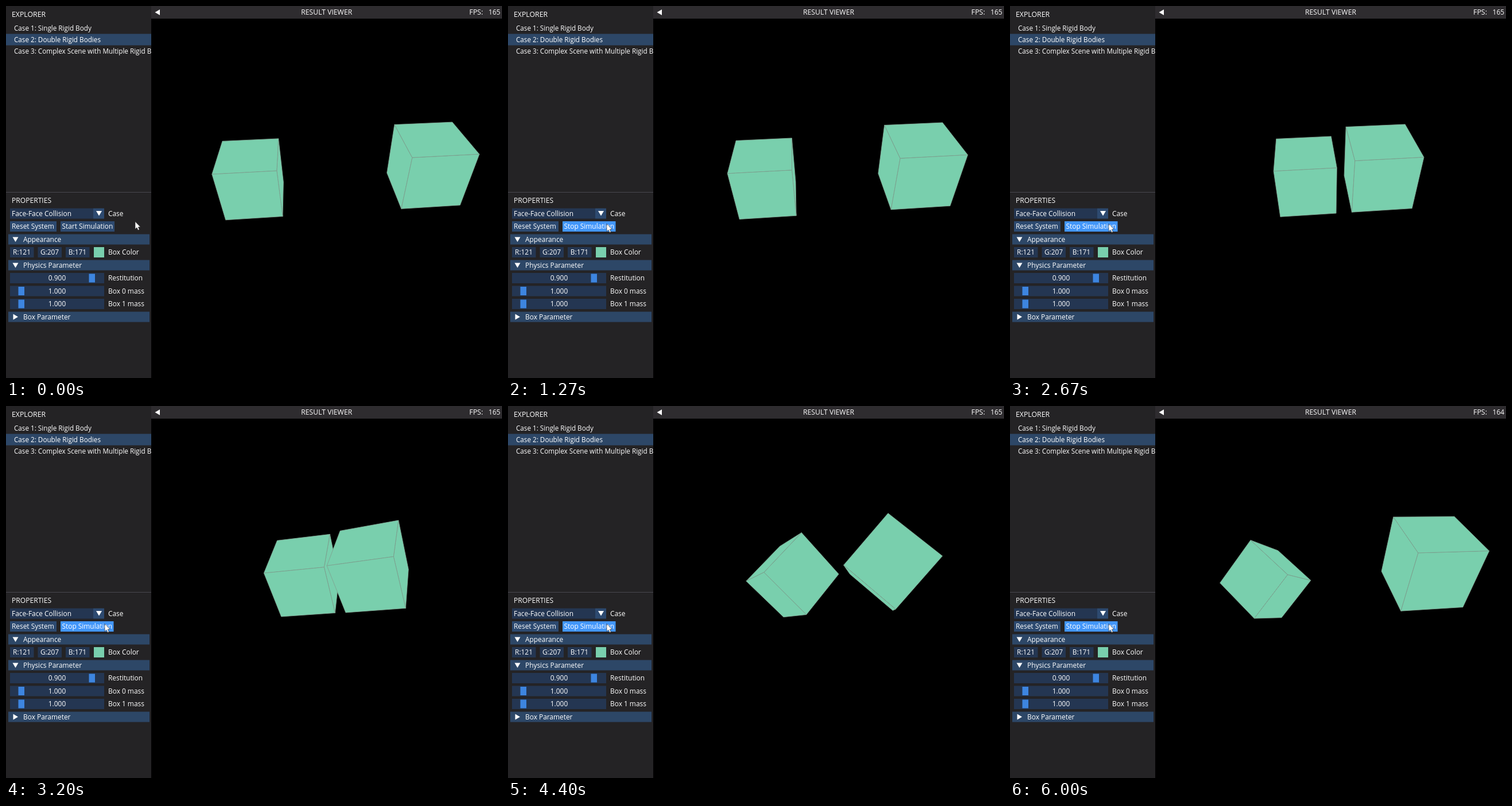
Animation, 864 px wide and 648 px high, one loop 6070 ms. Source, as an HTML page with a canvas:

```html
<!DOCTYPE html>
<html>
<head>
<meta charset="utf-8">
<style>
  html, body { margin: 0; width: 100%; height: 100%; overflow: hidden; background: #000; }
  canvas { display: block; }
</style>
</head>
<body>
<canvas id="stage" width="864" height="648"></canvas>
<script>
const ctx = document.getElementById('stage').getContext('2d');
const LOOP = 6070, START = 0.845, IMPACT = 2.88, SECOND_HIT = 3.8, SPEED = 0.487;
const FRAME = '#243652', BUTTON = '#2d4a70', HEADER = '#2d4767', GRAB = '#3d85e0', MINT = '#79cfad';

// Camera: centre of the view, focal length, world origin in camera space, pitch and yaw
const VIEW = { x: 558.5, y: 335, f: 542, origin: [0.1765, -0.456, 5.3825] };
const sp = Math.sin(0.7138), cp = Math.cos(0.7138), sy = Math.sin(0.0907), cy = Math.cos(0.0907);

// Positions at the first impact, velocities after each hit, spin in degrees per second
const boxes = [
  { at: [-0.5, -0.2, -0.207], side: -1, after: [-0.335, -0.15, -0.15], spin: [47.9, 31.5] },
  { at: [0.5, 0.2, 0.207], side: 1, after: [0.285, 0.14, 0.165], spin: [83, 44.4] }
];

function project([x, y, z]) {
  const [ox, oy, oz] = VIEW.origin;
  const cx = ox + x * cy + z * sy;
  const cyy = oy - x * sy * sp - y * cp + z * sp * cy;
  const cz = oz + x * sy * cp - y * sp - z * cp * cy;
  return [VIEW.x + VIEW.f * cx / cz, VIEW.y + VIEW.f * cyy / cz];
}

// Rotation about the diagonal axis (0, -1, 1)
function spinPoint([x, y, z], angle) {
  const c = Math.cos(angle), s = Math.sin(angle), r = Math.SQRT1_2;
  const m = (y + z) * r, n = (z - y) * r, m2 = s * x + c * m;
  return [c * x - s * m, (m2 - n) * r, (m2 + n) * r];
}

function polygon(points, fill, stroke, width = 1) {
  ctx.beginPath();
  points.forEach(p => ctx.lineTo(p[0], p[1]));
  ctx.closePath();
  if (fill) { ctx.fillStyle = fill; ctx.fill(); }
  if (stroke) { ctx.strokeStyle = stroke; ctx.lineWidth = width; ctx.stroke(); }
}

function drawBox(box, t) {
  const before = Math.min(Math.max(t, START), IMPACT) - IMPACT;
  const first = Math.min(Math.max(t - IMPACT, 0), SECOND_HIT - IMPACT);
  const second = Math.max(t - SECOND_HIT, 0);
  const angle = (box.spin[0] * first + box.spin[1] * second) * Math.PI / 180;
  const centre = box.at.map((p, i) => p + box.after[i] * second);
  centre[0] += box.side * (0.14 * first - SPEED * before);

  for (let axis = 0; axis < 3; axis++) for (const sign of [-0.5, 0.5]) {
    let face = [[-1, -1], [1, -1], [1, 1], [-1, 1]].map(([a, b]) => {
      const p = [];
      p[axis] = sign;
      p[(axis + 1) % 3] = a / 2;
      p[(axis + 2) % 3] = b / 2;
      return project(spinPoint(p, angle).map((v, i) => v + centre[i]));
    });
    if (sign < 0) face.reverse();
    const area = face.reduce((sum, p, i) => {
      const q = face[(i + 1) % 4];
      return sum + p[0] * q[1] - q[0] * p[1];
    }, 0);
    if (area < 0) polygon(face, MINT, '#7f9f8e', 0.8);
  }
}

function rect(x, y, w, h, color) {
  ctx.fillStyle = color;
  ctx.fillRect(x, y, w, h);
}

function text(str, x, y, align = 'left', size = 11.9) {
  ctx.font = size + 'px "Open Sans", "Noto Sans", sans-serif';
  ctx.textAlign = align;
  ctx.fillStyle = '#fff';
  ctx.fillText(str, x, y + 4.2);
}

function arrow(x, y, turn) {
  ctx.save();
  ctx.translate(x, y);
  ctx.rotate(turn * Math.PI / 2);
  polygon([[-4, -5], [4.5, 0], [-4, 5]], '#fff');
  ctx.restore();
}

const row = (x, y, w, color) => rect(x, y - 9, w, 18, color);

function header(label, y, turn) {
  row(4, y, 246, HEADER);
  arrow(16.5, y, turn);
  text(label, 30, y);
}

function slider(label, value, y, grab) {
  row(7, y, 164, FRAME);
  rect(grab, y - 7.5, 10.5, 15, GRAB);
  text(value, 89, y, 'center');
  text(label, 178, y);
}

function drawSidebar(t, cursorX) {
  rect(0, 0, 253, 648, '#242325');
  text('EXPLORER', 10, 14.5, 'left', 12.3);
  rect(0, 48.5, 253, 20, HEADER);
  text('Case 1: Single Rigid Body', 14, 38.5, 'left', 11.7);
  text('Case 2: Double Rigid Bodies', 14, 58.5, 'left', 11.7);
  text('Case 3: Complex Scene with Multiple Rigid Bodies', 14, 79, 'left', 11.7);
  rect(0, 324, 253, 1, '#48474f');
  text('PROPERTIES', 10, 338.5, 'left', 12.1);

  row(7, 361.5, 145, FRAME);
  row(152, 361.5, 19, BUTTON);
  arrow(162, 361, 1);
  text('Face-Face Collision', 10, 361.5);
  text('Case', 178, 361.5);

  const running = t >= START;
  row(7, 384, 81, BUTTON);
  row(95, 384, running ? 92.5 : 94, cursorX < 189 ? '#4296fa' : BUTTON);
  text('Reset System', 10, 384);
  text(running ? 'Stop Simulation' : 'Start Simulation', 97.5, 384);

  header('Appearance', 406.5, 1);
  ['R:121', 'G:207', 'B:171'].forEach((label, i) => {
    row(7 + i * 48.5, 429, 41.5, FRAME);
    text(label, 27.5 + i * 48.5, 429, 'center');
  });
  row(153, 429, 18, MINT);
  text('Box Color', 178, 429);

  header('Physics Parameter', 451.5, 1);
  slider('Restitution', '0.900', 474, 144.5);
  slider('Box 0 mass', '1.000', 496.5, 21.5);
  slider('Box 1 mass', '1.000', 519, 21.5);
  header('Box Parameter', 541.5, 0);
}

function drawCursor(x, y) {
  const shape = [[0, 0], [0, 13], [3, 10.4], [5, 15], [7.3, 14], [5.3, 9.6], [9.2, 9.4]];
  polygon(shape.map(p => [x + p[0], y + p[1]]), '#fff', '#222', 0.6);
}

function draw() {
  const tick = Math.floor(performance.now() % LOOP * 0.015 + 0.06) % 91;
  const t = tick / 15;
  const k = Math.min(Math.max((t - 0.15) / 0.5, 0), 1);
  const ease = k * k * (3 - 2 * k);
  const cursorX = 225 - 53 * ease, cursorY = 375.5 + 4 * ease;

  drawSidebar(t, cursorX);
  rect(253, 0, 611, 648, '#000');
  boxes.forEach(box => drawBox(box, t));
  rect(253, 0, 611, 22, '#2e2c2f');
  arrow(264, 11, 2);
  text('RESULT VIEWER', 558.5, 11, 'center', 12.2);
  text('FPS:', 807, 11, 'left', 12.4);
  text(t < 5.7 ? '165' : '164', 861, 11, 'right');
  drawCursor(cursorX, cursorY);
  requestAnimationFrame(draw);
}
draw();
</script>
</body>
</html>
```
